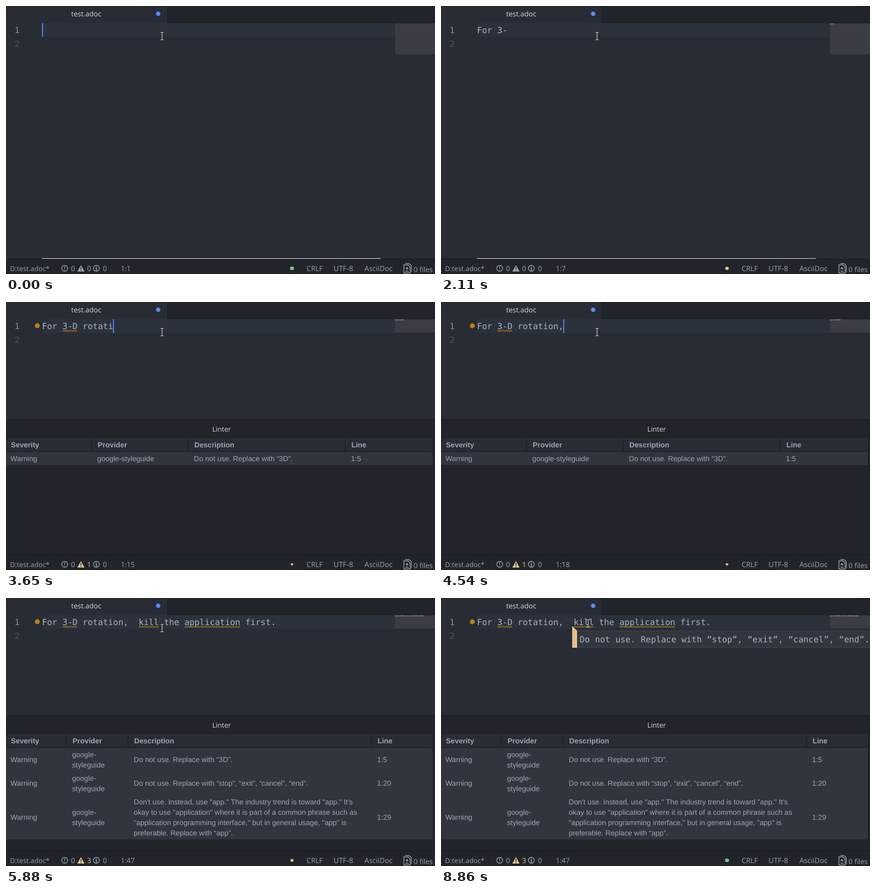
These frames come from a looping animation (870 px wide and 544 px high, 9.19 s). An HTML page:

```html
<!DOCTYPE html>
<html lang="en">
<head>
<meta charset="utf-8">
<title>Editor with linter</title>
<style>
html, body { margin: 0; width: 100%; height: 100%; overflow: hidden; background: #282c34; }
svg { display: block; width: 870px; height: 544px; }
text { white-space: pre; text-rendering: geometricPrecision; fill: #9da5b4; }
.ui { font: 14.3px "Open Sans", "Noto Sans", sans-serif; }
.code { font: 17.142px "DejaVu Sans Mono", "Noto Sans Mono", monospace; fill: #abb2bf; }
.cell { font: 14.72px "Liberation Sans", Arial, sans-serif; }
.head { font-weight: bold; }
.bright { fill: #d7dae0; }
.wave { fill: none; stroke: #b5820f; stroke-width: 1.1; }
.icon { fill: none; stroke: #9da5b4; stroke-width: 1.4; }
</style>
</head>
<body>
<svg id="stage" viewBox="0 0 870 544"></svg>
<script>
const LOOP = 9190;
const LINE = "For 3-D rotation,  kill the application first.";
const LEFT = 73, CHAR = 10.32, MAP_CHAR = 1.25;
const PANEL_AT = 3210, MORE_AT = 5880, TOOLTIP_AT = 7300;
const BUSY = { from: 1300, to: 7720, half: 482.3 };
const DARK = "#181a1f", BAR = "#21252b", EDITOR = "#282c34", ROW = "#31353e", AMBER = "#e2c08d";

// [time, typed characters]
const TYPED = [[0, 0], [500, 1], [730, 2], [830, 3], [1050, 4], [1370, 5], [1650, 6], [2170, 7],
  [2390, 8], [2590, 9], [2770, 10], [2990, 11], [3210, 12], [3350, 13], [3570, 14],
  [3790, 15], [4010, 16], [4240, 17]];
for (let i = 0; i < 7; i++) TYPED.push([4760 + i * 80, Math.round(17 + 29 * (i + 1) / 7)]);

// [time, caret shown] once typing is over
const BLINK = [[5240, 1], [5620, 0], [6020, 1], [6430, 0], [6820, 1], [7230, 0], [7640, 1],
  [8040, 0], [8480, 1], [8860, 0]];

const stage = document.getElementById("stage");

function add(tag, attrs, parent = stage) {
  const node = document.createElementNS("http://www.w3.org/2000/svg", tag);
  for (const key in attrs) node.setAttribute(key, attrs[key]);
  return parent.appendChild(node);
}
const rect = (x, y, width, height, fill, parent) => add("rect", { x, y, width, height, fill }, parent);
const path = (d, attrs, parent) => add("path", { d, ...attrs }, parent);
function text(x, y, content, cls, parent) {
  const node = add("text", { x, y, class: cls }, parent);
  node.textContent = content;
  return node;
}
const group = parent => add("g", {}, parent);
const show = (node, on) => { node.style.display = on ? "" : "none"; };
const last = (table, t) => table.filter(step => step[0] <= t).pop();

function wave(word, parent) {
  const start = LEFT + LINE.indexOf(word) * CHAR;
  const end = start + word.length * CHAR;
  let d = `M${start} 59.5`;
  for (let x = start + 2.5, up = true; x <= end; x += 2.5, up = !up) d += `L${x} ${up ? 57.5 : 59.5}`;
  path(d, { class: "wave" }, parent);
}

function table(columns, rows) {
  const g = group(panel);
  columns.forEach(([title, x], i) => {
    text(x + 1, 295, title, "cell head", g);
    if (i) rect(x - 12, 277, 1, 26, DARK, g);
  });
  let top = 304;
  for (const cells of rows) {
    const height = 6 + 21 * Math.max(...cells.map(lines => lines.length));
    rect(0, top, 865, height, ROW, g);
    cells.forEach((lines, col) => {
      const first = top + height / 2 - 10.5 * (lines.length - 1) + 5.2;
      lines.forEach((line, i) => text(columns[col][1], first + 21 * i, line, "cell", g));
    });
    top += height;
  }
  return g;
}

// Tabs and editor
rect(0, 0, 870, 544, EDITOR);
rect(327, 0, 543, 35, BAR);
rect(327, 0, 1, 35, DARK);
rect(327, 34, 543, 1, DARK);
text(132.3, 21, "test.adoc", "ui bright");
add("circle", { cx: 308.5, cy: 15.7, r: 4.5, fill: "#568af2" });
rect(LEFT, 35, 716, 28, "#2c323b");
text(17.2, 55, "1", "code").style.fill = "#838993";
text(17.2, 83, "2", "code").style.fill = "#4b5263";
const mapView = rect(789, 35, 81, 63, "#3a3d44");
const mapText = group();
const mapMarks = [...LINE].map((c, i) =>
  rect(789 + i * MAP_CHAR, 35, MAP_CHAR, 2.4, c === " " ? "none" : "#777b83", mapText));

const firstMark = group(), moreMarks = group();
add("circle", { cx: 63.5, cy: 48.3, r: 5, fill: "#b8820f" }, firstMark);
wave("3-D", firstMark);
wave("kill", moreMarks);
wave("application", moreMarks);

const code = text(LEFT, 55, "", "code");
const caret = rect(LEFT, 35, 2, 28, "#528bff");
const scrollLine = rect(LEFT, 512, 687, 1, "#f4f5f6");

// Linter panel
const panel = group();
rect(0, 238, 870, 276, BAR, panel);
rect(0, 238, 870, 1, DARK, panel);
text(418.5, 263, "Linter", "ui bright", panel).style.fontSize = "13.9px";
rect(0, 277, 865, 26, EDITOR, panel);
rect(0, 303, 865, 1, DARK, panel);
const columnsAt = (...xs) => ["Severity", "Provider", "Description", "Line"].map((name, i) => [name, xs[i]]);
const narrow = ["google-", "styleguide"];
const oneIssue = table(columnsAt(9, 185, 381, 699.5), [
  [["Warning"], ["google-styleguide"], ["Do not use. Replace with “3D”."], ["1:5"]]
]);
const allIssues = table(columnsAt(9, 134, 259, 752.5), [
  [["Warning"], narrow, ["Do not use. Replace with “3D”."], ["1:5"]],
  [["Warning"], narrow, ["Do not use. Replace with “stop”, “exit”, “cancel”, “end”."], ["1:20"]],
  [["Warning"], narrow, [
    "Don't use. Instead, use \"app.\" The industry trend is toward \"app.\" It's",
    "okay to use \"application\" where it is part of a common phrase such as",
    "\"application programming interface,\" but in general usage, \"app\" is",
    "preferable. Replace with “app”."], ["1:29"]]
]);

// Status bar
rect(0, 513, 870, 31, BAR);
rect(0, 513, 870, 1, DARK);
text(8.3, 538, "D:test.adoc*", "ui").style.fontSize = "13.8px";
add("circle", { cx: 119, cy: 532.5, r: 6, class: "icon" });
path("M119 528.7v4.4M119 534.6v1.8", { class: "icon", "stroke-width": 1.8 });
text(131.8, 538, "0", "ui");
const triangle = path("M152 526 159.3 539H144.7Z", { "stroke-linejoin": "round" });
path("M152 530v4.4M152 535.8v1.7", { stroke: BAR, "stroke-width": 1.7 });
const warnings = text(164.5, 538, "0", "ui");
add("circle", { cx: 183.3, cy: 532.5, r: 6, class: "icon" });
path("M183.3 528.8v1.7M181.8 532h1.7v4M181.6 536h3.6", { class: "icon" });
text(196.4, 538, "0", "ui");
const position = text(232.8, 538, "", "ui");
const busyDot = add("rect", { x: -4, y: -3.5, width: 8, height: 7, rx: 3.3 });
text(609.7, 538, "CRLF", "ui");
text(664.3, 538, "UTF-8", "ui").style.fontSize = "14.7px";
text(727, 538, "AsciiDoc", "ui").style.fontSize = "14.6px";
path("M807 525.5h8l4.5 4.5v12h-12.5zM810 522.7h7.3l4.7 4.7v12.6M813.2 529.5v6M810.2 532.5h6M810.2 538.5h6",
  { class: "icon" });
text(826.5, 540, "0 files", "ui");

// Hover message and pointer
const tooltip = group();
rect(275, 66, 595, 35, "#3e444f", tooltip);
rect(276, 67, 594, 33, "#31363f", tooltip);
path("M266 57 276 66.5V101H266Z", { fill: AMBER }, tooltip);
text(281.3, 90, "Do not use. Replace with “stop”, “exit”, “cancel”, “end”.", "code", tooltip);
const pointer = path("M-3-7.5H-1Q0-7.5 0-6.5Q0-7.5 1-7.5H3M0-6.5V6.5M-3 7.5H-1Q0 7.5 0 6.5Q0 7.5 1 7.5H3",
  { fill: "none", stroke: "#e4e6e8", "stroke-width": 1.1 });

function caretShown(t) {
  if (t < 120) return true;
  if (t < 500) return false;
  if (t >= 5240) return !!last(BLINK, t)[1];
  return (t - last(TYPED, t)[0]) % 800 < 400;
}

function busyScale(t) {
  const phase = (t - BUSY.from) / BUSY.half;
  return 0.8 + 0.2 * Math.cos(Math.PI * phase);
}

function render(t) {
  const count = last(TYPED, t)[1];
  const linting = t >= PANEL_AT, more = t >= MORE_AT;
  const busy = t >= BUSY.from && t < BUSY.to;

  code.textContent = LINE.slice(0, count);
  position.textContent = "1:" + (count + 1);
  mapMarks.forEach((mark, i) => show(mark, i < count));
  caret.setAttribute("x", Math.max(LEFT, LEFT - 0.6 + count * CHAR));
  show(caret, caretShown(t));

  show(panel, linting);
  show(oneIssue, !more);
  show(allIssues, more);
  show(firstMark, linting);
  show(moreMarks, more);
  show(scrollLine, !linting);
  mapView.setAttribute("height", linting ? 27 : 63);
  warnings.textContent = more ? "3" : linting ? "1" : "0";
  warnings.style.fill = triangle.style.fill = linting ? AMBER : "#9da5b4";

  busyDot.setAttribute("fill", busy ? AMBER : "#73c990");
  busyDot.setAttribute("transform", `translate(580 532.5) scale(${busy ? busyScale(t) : 1})`);

  const p = Math.min(1, Math.max(0, (t - 6830) / 370));
  const move = p * p * (3 - 2 * p);
  pointer.setAttribute("transform", `translate(${316.5 - 18 * move} ${61 - 9.5 * move})`);
  show(tooltip, t >= TOOLTIP_AT);
}

const start = performance.now();
function tick() {
  render((performance.now() - start) % LOOP);
  requestAnimationFrame(tick);
}
tick();
</script>
</body>
</html>
```
